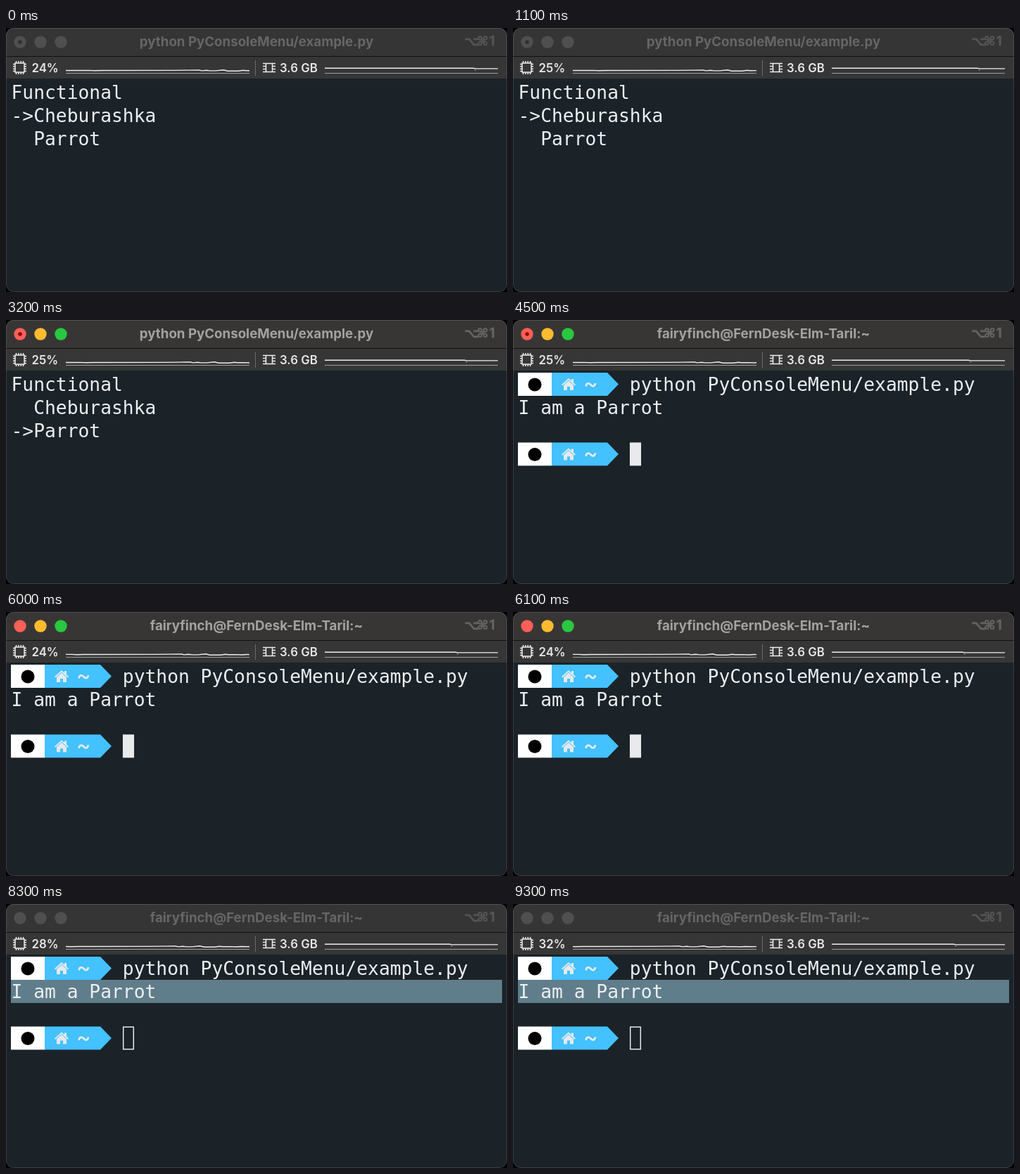
Animation of 712x376 px, one loop 9400 ms. Source, as an HTML page:

```html
<!DOCTYPE html>
<html>
<head>
<meta charset="utf-8">
<style>
  html, body { margin: 0; width: 100%; height: 100%; overflow: hidden; background: #000; }
  svg { display: block; }
  text { white-space: pre; }
  .ui { font-family: Inter, sans-serif; font-weight: 600; }
  .term { font: 26.3px "DejaVu Sans Mono", monospace; fill: #eceff1; }
  .stat { font-size: 16.8px; fill: #e6e6e6; }
  .line { fill: none; stroke: #f0f0f0; stroke-width: 1.4; }
</style>
</head>
<body>
<svg width="712" height="376" viewBox="0 0 712 376">
  <defs>
    <clipPath id="window"><rect width="712" height="376" rx="11"/></clipPath>
    <clipPath id="cpuArea"><rect x="85" y="46" width="261" height="24"/></clipPath>
    <clipPath id="memArea"><rect x="453" y="46" width="246" height="24"/></clipPath>
    <g id="prompt">
      <path d="M7 0h48v33h-48z" fill="#fff"/>
      <circle cx="31" cy="17" r="9.5"/>
      <path d="M55 0h79l16 16.5-16 16.5h-79z" fill="#44c1ff"/>
      <path d="M69 17l10-9 4 3.6v-2.600h3v5.300l3 2.700-1.300 1.500-8.700-7.900-8.700 7.900zM72 18l7-6.400 7 6.400v7h-5v-5h-4v5h-5z" fill="#e4e9ec"/>
      <path d="M103.500 19.500c1-5 4.500-5 7-2.200s5.500 2.700 6.500-2.300" fill="none" stroke="#e4e9ec" stroke-width="2.800"/>
    </g>
  </defs>
  <g clip-path="url(#window)">
    <rect width="712" height="376" fill="#1b2329"/>
    <rect id="bar" width="712" height="41"/>
    <rect y="41" width="712" height="31" fill="#363636"/>
    <path d="M0 40.500h712" stroke="#111"/>

    <circle class="light" cx="20" cy="20" r="8.700"/>
    <circle class="light" cx="49" cy="20" r="8.700"/>
    <circle class="light" cx="78" cy="20" r="8.700"/>
    <circle id="dot" cx="20" cy="20" r="2.800"/>
    <text id="title" class="ui" x="356" y="26" font-size="18.700" style="font-weight:700" text-anchor="middle"></text>
    <g id="shortcut" class="ui" font-size="18" stroke-width=".6">
      <text x="651.500" y="25" font-family="DejaVu Sans, sans-serif">⌥</text>
      <text x="669" y="25" font-family="DejaVu Sans, sans-serif">⌘</text>
      <text x="687" y="25">1</text>
    </g>

    <g fill="none" stroke="#ececec" stroke-width="1.500">
      <rect x="13" y="50" width="13" height="13"/>
      <path d="M14.500 47v3m3.300-3v3m3.400-3v3m3.300-3v3M14.500 63v3m3.300-3v3m3.400-3v3m3.300-3v3M10 51.500h3m-3 3.300h3m-3 3.400h3m-3 3.300h3M26 51.500h3m-3 3.300h3m-3 3.400h3m-3 3.300h3"/>
      <path d="M369.500 50.500h9v12h-9zM365 50.500h4m-4 4h4m-4 4h4m-4 4h4M379 50.500h4m-4 4h4m-4 4h4m-4 4h4"/>
    </g>
    <text id="cpu" class="ui stat" x="36.500" y="63"></text>
    <text class="ui stat" x="389" y="63">3.6 GB</text>
    <path d="M354.500 46v22" stroke="#6c6c6c"/>
    <path d="M85 64.500h261M453 64.500h246" stroke="#a0a0a0"/>
    <g clip-path="url(#cpuArea)"><path id="cpuLine" class="line"/></g>
    <g clip-path="url(#memArea)">
      <g id="memLine">
        <path class="line" d="M453 57.300H664l3 .6H760"/>
        <path d="M667 58v3" stroke="#999"/>
      </g>
    </g>

    <g id="menu" class="term">
      <text x="7.500" y="101">Functional</text>
      <text id="first" x="7.500" y="134"></text>
      <text id="second" x="7.500" y="167"></text>
    </g>
    <g id="shell">
      <rect id="highlight" x="7" y="108" width="698" height="33" fill="#607d8b"/>
      <use href="#prompt" y="75"/>
      <text class="term" x="165.800" y="101">python PyConsoleMenu/example.py</text>
      <text class="term" x="7.500" y="134">I am a Parrot</text>
      <use href="#prompt" y="174.500"/>
      <rect id="cursor" stroke="#e8eaec" stroke-width="1.500" x="166.700" y="175.200" width="14.600" height="31.600"/>
    </g>
    <rect x=".5" y=".5" width="711" height="375" rx="10.500" fill="none" stroke="#fff" stroke-opacity=".13"/>
  </g>
</svg>
<script>
const LOOP = 9400, ENTER = 4400, SAMPLE = 4.2;
const $ = id => document.getElementById(id);
const lights = document.querySelectorAll('.light');
const colors = ['#fe5f57', '#febb2e', '#28c840'];
const loads = [24, 25, 26, 25, 25, 24, 24, 26, 28, 32];
const load = [
  [85, 60.5], [118, 60.4], [126, 60.8], [136, 60.5], [235, 60.4], [260, 60.1],
  [275, 60], [278, 60.9], [285, 60.3], [290, 60.9], [298, 60.9],
  [309, 59.7], [315, 61.3], [330, 61.2], [337, 60.3], [341, 60.8], [352, 60.6],
  [360, 61], [368, 60.5], [376, 60.8], [390, 60.5]
];
$('cpuLine').setAttribute('d', 'M' + load.join('L'));

const show = (id, on) => $(id).style.display = on ? '' : 'none';
const between = (t, a, b) => t >= a && t < b;

function draw(t) {
  const focused = between(t, 1500, 8000);
  const titleActive = between(t, 1500, 8100);
  const inMenu = t < ENTER;
  const parrot = between(t, 2600, 3500) || t >= 4000;
  const step = Math.floor((t + 300) / 1000);
  const shortcutColor = titleActive ? '#666463' : '#555';

  $('bar').setAttribute('fill', titleActive ? '#383635' : '#353535');
  lights.forEach((light, i) => light.setAttribute('fill', focused ? colors[i] : '#4f4f4f'));
  show('dot', t < 5500);
  $('dot').setAttribute('fill', focused ? '#8c0a06' : '#303030');
  $('title').textContent = inMenu ? 'python PyConsoleMenu/example.py' : 'fairyfinch@FernDesk-Elm-Taril:~';
  $('title').setAttribute('fill', titleActive ? '#a4a2a1' : '#666');
  $('shortcut').setAttribute('fill', shortcutColor);
  $('shortcut').setAttribute('stroke', shortcutColor);

  $('cpu').textContent = loads[step] + '%';
  for (const id of ['cpuLine', 'memLine'])
    $(id).setAttribute('transform', `translate(${-SAMPLE * step})`);

  show('menu', inMenu);
  show('shell', !inMenu);
  $('first').textContent = (parrot ? '  ' : '->') + 'Cheburashka';
  $('second').textContent = (parrot ? '->' : '  ') + 'Parrot';
  show('highlight', t >= 6500);
  $('cursor').setAttribute('fill', focused ? '#e8eaec' : 'none');
}

const start = performance.now();
function tick() {
  draw((performance.now() - start) % LOOP);
  requestAnimationFrame(tick);
}
tick();
</script>
</body>
</html>
```
